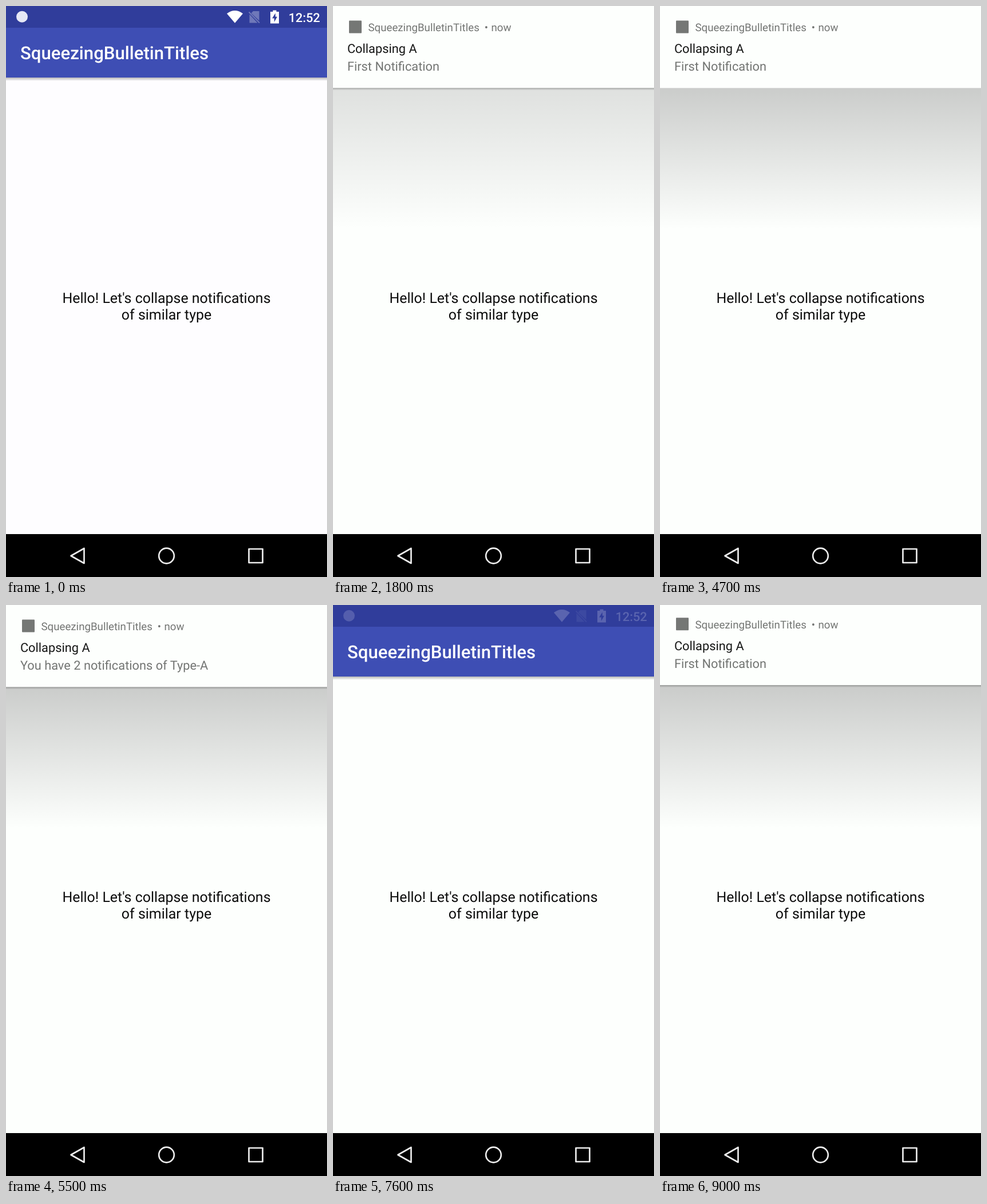
Recreate the animation shown at these times as an HTML page. Size 561 px wide and 998 px high, loop 9.1 s.

```html
<!DOCTYPE html>
<html lang="en">
<head>
<meta charset="utf-8">
<title>Heads-up notification</title>
<style>
  html, body { margin: 0; width: 100%; height: 100%; overflow: hidden; background: #000; }
  svg { display: block; width: 100%; height: 100%; }
  text { font-family: Roboto, "Noto Sans", sans-serif; white-space: pre; }
</style>
</head>
<body>
<svg viewBox="0 0 561 998" text-rendering="geometricPrecision">
  <defs>
    <linearGradient id="scrimFade" x2="0" y2="1">
      <stop stop-opacity=".315"/>
      <stop offset="1" stop-opacity="0"/>
    </linearGradient>
    <linearGradient id="barFade" x2="0" y2="1">
      <stop stop-opacity=".28"/>
      <stop offset="1" stop-opacity="0"/>
    </linearGradient>
  </defs>

  <rect id="page" width="561" height="924"/>
  <g font-size="24.93" text-anchor="middle" fill="#0c0c0c">
    <text x="280.5" y="518.7">Hello! Let's collapse notifications</text>
    <text x="280.5" y="548">of similar type</text>
  </g>

  <rect y="125" width="561" height="6" fill="url(#barFade)"/>
  <rect y="37" width="561" height="88" fill="#3e4eb4"/>
  <rect width="561" height="38" fill="#303d9b"/>
  <text x="24.9" y="93.3" font-size="31.17" font-weight="500" fill="#fff">SqueezingBulletinTitles</text>

  <g id="status" fill="#fff">
    <rect id="newIcon" x="17.5" y="8.5" width="21" height="20.5"/>
    <circle id="oldIcon" cy="18.7" r="10" fill="#e6e8f5"/>
    <path d="M386 13.3Q400 2.8 414 13.3L400 29.8Z"/>
    <g opacity=".3">
      <path d="M432 9H442.5V25.5L428.5 12.5ZM425.5 14.5L439.5 29.5H425.5Z"/>
      <path d="M424.5 10.5L443 29.5" stroke="#fff" stroke-width="2"/>
    </g>
    <path d="M462 10H466.5V7.5H472.5V10H477V30.5H462Z"/>
    <path d="M470.8 12.5L465.2 21.5H468.8V28L474 18.8H470.8Z" fill="#303d9b"/>
    <text x="549" y="27.5" font-size="21.8" font-weight="500" text-anchor="end">12:52</text>
  </g>

  <rect id="scrim" width="561" height="390" fill="url(#scrimFade)"/>

  <g id="card">
    <rect id="cardShadow" y="143" width="561" height="4.5" fill="url(#barFade)"/>
    <rect y="-30" width="561" height="173.3" fill="#fdfffd"/>
    <rect x="28" y="25.5" width="22" height="22" rx="1" fill="#757775"/>
    <g font-size="18.7" fill="#737573">
      <text x="61.5" y="44.3">SqueezingBulletinTitles</text>
      <text x="268" y="44.3" text-anchor="middle">•</text>
      <text x="276.5" y="44.3">now</text>
    </g>
    <g font-size="21.8">
      <text x="24.9" y="82.4" fill="#151615">Collapsing A</text>
      <text id="message" x="24.9" y="113" fill="#737573"></text>
    </g>
  </g>

  <rect y="923" width="561" height="75"/>
  <g fill="none" stroke="#ececec" stroke-width="2.7" stroke-linejoin="round">
    <path d="M113.5 961L136.5 948V974Z"/>
    <circle cx="280.5" cy="961" r="13.3"/>
    <rect x="424.5" y="949" width="24" height="24"/>
  </g>
</svg>
<script>
  const LOOP = 9100, TICK = 100;
  const CARD_HEIGHT = 143.5, APPEAR = 650, LEAVE = 230;
  const FIRST = 1560, LIFT_OFF = 4700, UPDATE = 4833, EXIT = 6960, AGAIN = 8460;

  const $ = id => document.getElementById(id);
  const ramp = (t, from, to) => Math.min(1, Math.max(0, (t - from) / (to - from)));
  const bezier = (s, [a, b, c, d]) => {
    const r = 1 - s;
    return a * r ** 3 + 3 * b * s * r * r + 3 * c * s * s * r + d * s ** 3;
  };

  // Drop in past the resting place, spring back a little too far, settle.
  const springPath = [
    { x: [0, .4, .4, .5], y: [0, 1.125, 1.125, 1.125] },
    { x: [.5, .62, .56, .8], y: [1.125, 1.125, .975, .975] },
    { x: [.8, .88, .84, 1], y: [.975, .975, 1, 1] }
  ];

  function spring(p) {
    if (p <= 0) return 0;
    if (p >= 1) return 1;
    const part = springPath.find(piece => p <= piece.x[3]);
    let low = 0, high = 1;
    for (let i = 0; i < 24; i++) {
      const mid = (low + high) / 2;
      if (bezier(mid, part.x) < p) low = mid; else high = mid;
    }
    return bezier(low, part.y);
  }

  function cardPosition(t) {
    if (t >= AGAIN) return spring((t - AGAIN) / APPEAR);
    if (t >= EXIT) return 1 - ramp(t, EXIT, EXIT + LEAVE) ** 1.5;
    if (t >= UPDATE) return spring((t - UPDATE) / APPEAR);
    if (t >= 2200) return 1;
    return spring((t - FIRST) / APPEAR);
  }

  function scrimLevel(t) {
    if (t >= AGAIN) return ramp(t, AGAIN, AGAIN + 400);
    if (t >= EXIT) return 1 - ramp(t, EXIT, 7400);
    return ramp(t, FIRST, FIRST + 400);
  }

  function statusLevel(t) {
    if (t >= AGAIN) return 1 - ramp(t, AGAIN, AGAIN + 160);
    if (t >= EXIT) return ramp(t, 7500, 8000);
    return 1 - ramp(t, FIRST, FIRST + 160);
  }

  function draw(t) {
    const position = cardPosition(t);
    const posted = t >= 8400 || (t >= 1500 && t < EXIT);
    const updated = t >= UPDATE && t < AGAIN;

    $("page").setAttribute("fill", t < 1600 ? "#fefdff" : "#fdfffd");
    $("status").setAttribute("opacity", statusLevel(t));
    $("newIcon").setAttribute("visibility", posted ? "visible" : "hidden");
    $("oldIcon").setAttribute("cx", posted ? 65.5 : 28);
    $("scrim").setAttribute("opacity", scrimLevel(t));

    const offset = (position - 1) * CARD_HEIGHT;
    $("card").setAttribute("visibility", position > 0 ? "visible" : "hidden");
    $("card").setAttribute("transform", `translate(0 ${offset.toFixed(2)})`);
    $("cardShadow").setAttribute("opacity", t >= LIFT_OFF && t < UPDATE ? 0 : 1);
    $("message").textContent = updated ? "You have 2 notifications of Type-A" : "First Notification";
  }

  const start = performance.now();
  function frame() {
    const t = (performance.now() - start) % LOOP;
    draw(Math.floor(t / TICK) * TICK);
    requestAnimationFrame(frame);
  }
  draw(0);
  requestAnimationFrame(frame);
</script>
</body>
</html>
```
